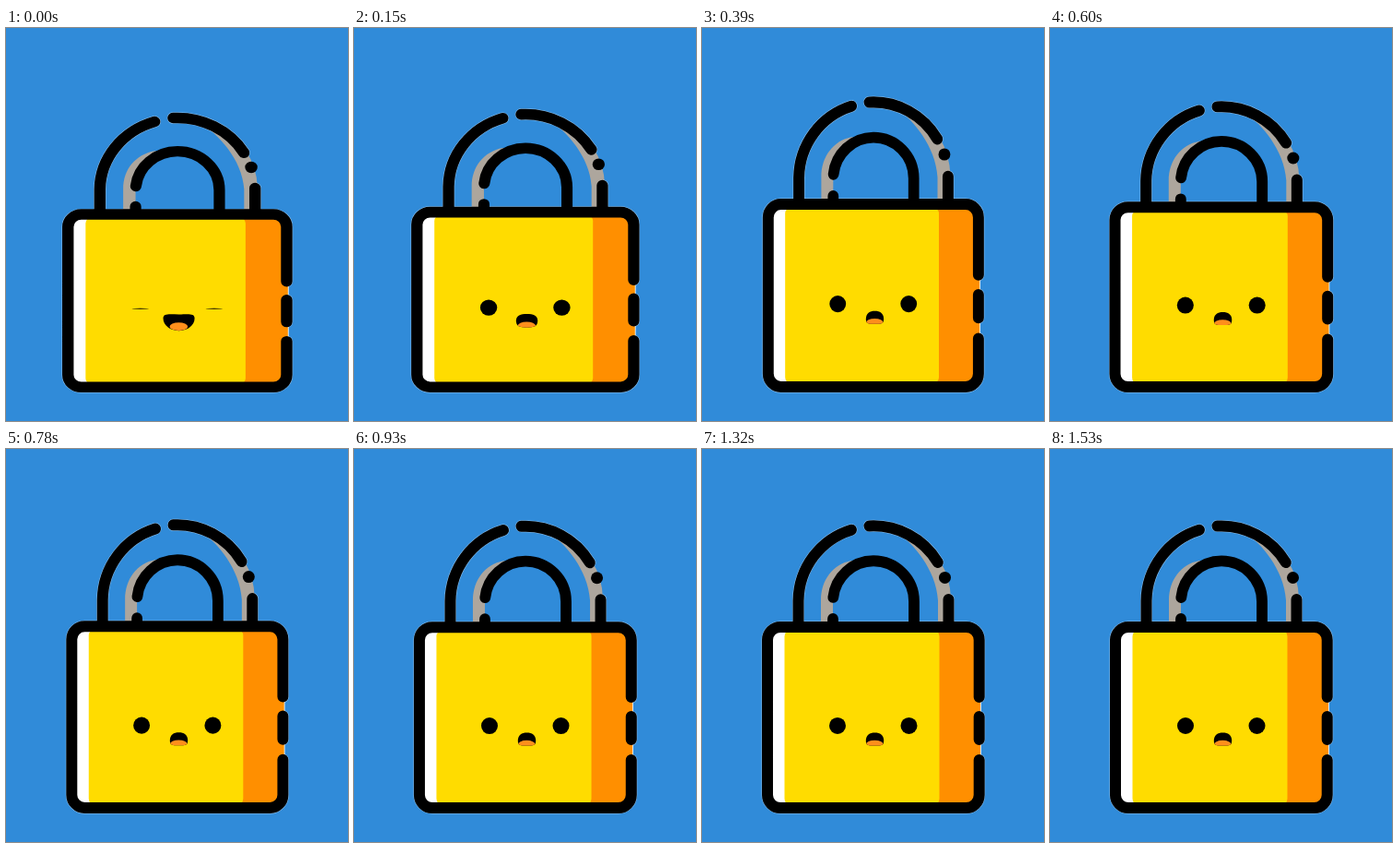
Recreate the animation shown at these times as an HTML page. Size 371 by 426 pixels, loop 1560 ms.

```html
<!DOCTYPE html>
<html lang="en">
<head>
<meta charset="utf-8">
<title>Padlock</title>
<style>
  html, body { margin: 0; height: 100%; overflow: hidden; background: #308bd9; }
  svg { display: block; width: 371px; height: 426px; }
  .line, .rim { fill: none; stroke-linecap: round; stroke-linejoin: round; }
  .line { stroke: #000; stroke-width: 12; }
  .rim { stroke: #fff; stroke-width: 13; opacity: .45; }
</style>
</head>
<body>
<svg viewBox="0 0 371 426">
  <defs>
    <path id="arch" d="M104.500 193V164.500A81.500 81.500 0 0 1 162 87.700M181.500 83.500A81.500 81.500 0 0 1 255.800 123M267.500 163V193"/>
    <path id="case" d="M300.700 269V207A14 14 0 0 0 286.700 193H85A14 14 0 0 0 71 207V375A14 14 0 0 0 85 389H286.700A14 14 0 0 0 300.700 375V337M300.700 290V315"/>
    <clipPath id="inside"><path class="mouth"/></clipPath>
  </defs>
  <g id="lock">
    <g class="rim"><use href="#arch"/><use href="#case"/></g>
    <g fill="#ada69d">
      <path d="M129 193V164C129 142 142 125 162 121L172 122C154 129 142 145 142 164V193Z"/>
      <path d="M214 92C228 102 254 130 256 164V193H268V164L270 162A84 84 0 0 0 258 121Z"/>
    </g>
    <g class="line">
      <use href="#arch"/>
      <path d="M263.500 139.500h.01" stroke-width="13"/>
      <path d="M142.300 161A44.300 44.300 0 0 1 186 121.300A44 44 0 0 1 230 165.300V193M142 184V193" stroke-width="11.800"/>
    </g>
    <rect x="71" y="193" width="231.800" height="196" rx="14" fill="#fff"/>
    <path d="M250 193H288A14 14 0 0 1 302 207V375A14 14 0 0 1 288 389H250Z" fill="#ff8f00"/>
    <rect x="89.500" y="196" width="168" height="190" rx="7" fill="#ffdc00"/>
    <use class="line" href="#case"/>
    <ellipse class="eye" cx="147" cy="300" rx="9" ry="9"/>
    <ellipse class="eye" cx="224.500" cy="300" rx="9" ry="9"/>
    <path class="mouth"/>
    <ellipse cx="187.300" cy="320.300" rx="9.500" ry="4.500" fill="#ff8f1c" clip-path="url(#inside)"/>
  </g>
</svg>
<script>
const LOOP = 1560, STEP = 30;
const RELEASE = 75, SPRING = 1560, SQUASH = 0.085;
const BLINK = 1140, BLINK_HALF = 90;

const lock = document.getElementById('lock');
const eyes = document.querySelectorAll('.eye');
const mouths = document.querySelectorAll('.mouth');
const clamp = v => Math.min(1, Math.max(0, v));

// Press down, then let go with an elastic ease-out.
function stretch(t) {
  if (t < RELEASE) return -SQUASH + 0.04 * (1 - t / RELEASE) ** 2;
  const p = (t - RELEASE) / SPRING;
  return SQUASH * 2 ** (-10 * p) * Math.sin((p - 0.075) * 2 * Math.PI / 0.3);
}

// open = 1 is the wide smile, 0 the small round mouth.
function mouthPath(open) {
  const mix = (small, wide) => small + (wide - small) * open;
  const cx = 187.5, half = mix(9.7, 16.5);
  const side = mix(316, 311), top = mix(307.5, 306.5), bottom = mix(321.5, 325);
  const upper = mix(310, 305), lower = mix(321.5, 319);
  const a = mix(5.5, 10), b = mix(7.5, 9);
  return `M${cx - half} ${side}C${cx - half} ${upper} ${cx - a} ${top} ${cx} ${top}` +
    `S${cx + half} ${upper} ${cx + half} ${side}` +
    `C${cx + half} ${lower} ${cx + b} ${bottom} ${cx} ${bottom}` +
    `S${cx - half} ${lower} ${cx - half} ${side}Z`;
}

function draw() {
  const t = Math.floor(performance.now() % LOOP / STEP) * STEP;
  const s = stretch(t);
  lock.setAttribute('transform',
    `translate(185.7 395) scale(${1 - 0.73 * s} ${1 + s}) translate(-185.7 -395)`);

  const lid = clamp(Math.min(t / 120, Math.abs(t - BLINK) / BLINK_HALF));
  eyes.forEach(eye => eye.setAttribute('ry', 0.5 + 8.5 * lid));

  const d = mouthPath(clamp(1 - t / 200));
  mouths.forEach(mouth => mouth.setAttribute('d', d));
  requestAnimationFrame(draw);
}
draw();
</script>
</body>
</html>
```
